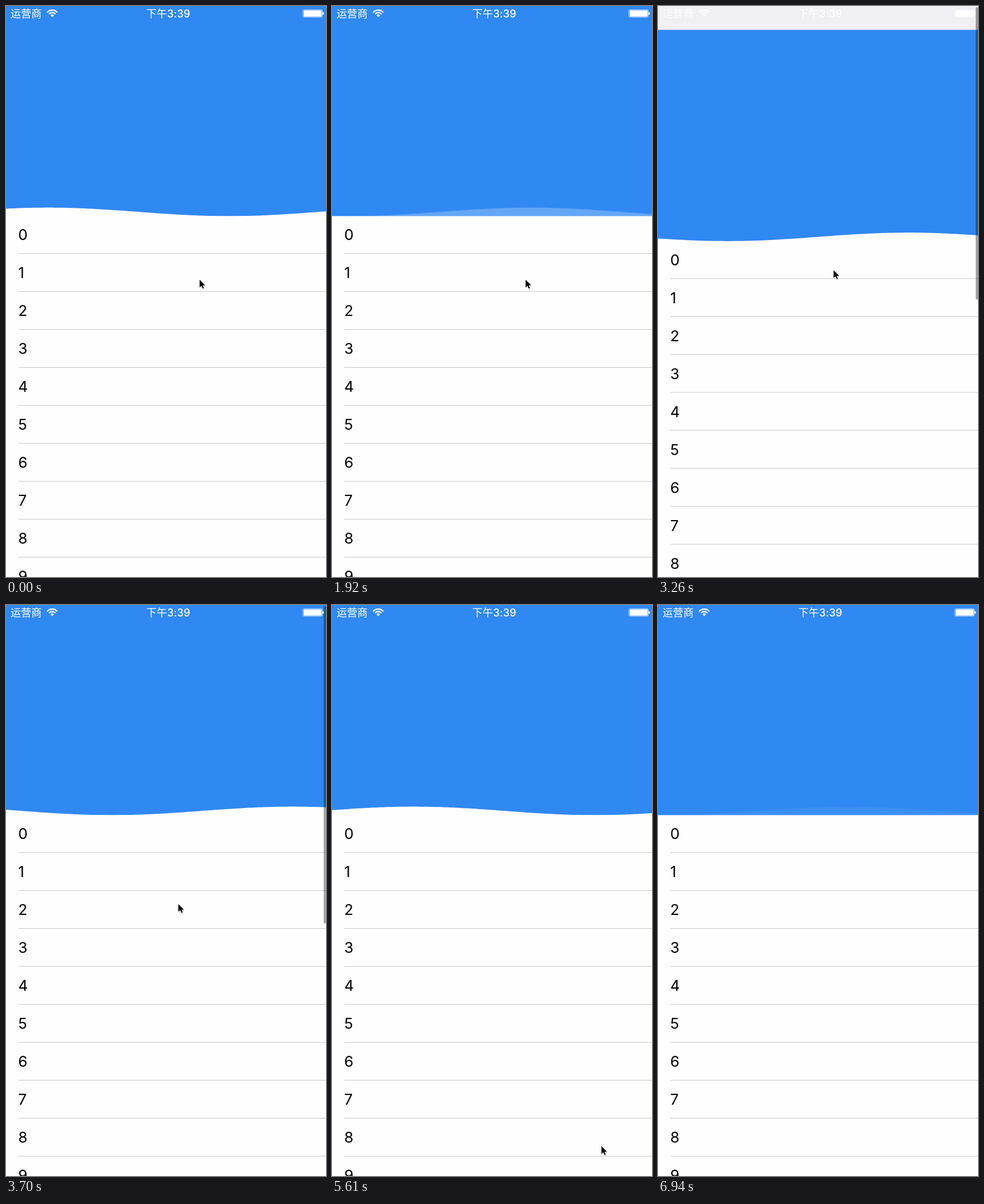
Recreate the animation shown at these times as an HTML page. Size 557 by 993 pixels, loop 7.34 s.

```html
<!DOCTYPE html>
<html lang="zh">
<head>
<meta charset="utf-8">
<style>
  html, body { margin: 0; width: 100%; height: 100%; overflow: hidden; background: #efeff4; }
  svg { display: block; width: 557px; height: 993px; }
  text { font-family: Inter, "Noto Sans CJK SC", "Noto Sans CJK", sans-serif; }
  .row { font-size: 26px; }
  .carrier { font-size: 18px; }
  .clock { font-size: 18px; font-weight: 500; letter-spacing: .25px; }
</style>
</head>
<body>
<svg viewBox="0 0 557 993">
  <g id="page">
    <rect y="-2" width="557" height="368" fill="#3088f3"/>
    <path id="wave" fill="#fefefe"/>
    <rect y="365.4" width="557" height="700" fill="#fefefe"/>
    <g id="rows"></g>
  </g>
  <g fill="#fff">
    <text class="carrier" x="8" y="19.5">运营商</text>
    <g fill="none" stroke="#fff" stroke-width="2.3">
      <path d="M71.7 11.2A11.7 11.7 0 0 1 89.3 11.2"/>
      <path d="M74.9 14A7.5 7.5 0 0 1 86.1 14"/>
    </g>
    <path d="M80.5 19.3L77.5 16.3A4.3 4.3 0 0 1 83.5 16.3Z"/>
    <text class="clock" x="244" y="19.5">下午3:39</text>
    <rect x="516.5" y="6.5" width="34" height="13" rx="2" fill="none" stroke="#fff" stroke-opacity=".6"/>
    <rect x="518" y="7.5" width="31.5" height="11" rx="1"/>
    <path d="M551 10.5Q553.5 10.8 553.5 13T551 15.5Z"/>
  </g>
  <rect id="bar" x="553" y="2" width="4" rx="2" fill="#000" fill-opacity=".36"/>
  <g id="cursor">
    <path d="M.5 1.5V15.5L3.8 12.5L6.1 17.5L8.4 16.5L6.2 11.7H10.5Z" opacity=".22"/>
    <path d="M0 0V13.5L3.2 10.6L5.4 15.5L7.5 14.5L5.4 9.8H9.6Z" stroke="#fff" stroke-width="1.8" paint-order="stroke"/>
  </g>
</svg>
<script>
// The picture advances in equal steps; the last one is held until the loop ends.
const LOOP = 7340, STEP = 147.66, LAST = 47;
const PULL = 20, RELEASE = 23, REST = 25;
const WAVE = { length: 630, height: 7.4, middle: 358, speed: 21 };

const moves = [
  { from: 15.5, to: 18, dx: -21, dy: -128 },
  { from: 19, to: 24, dx: -16, dy: 172 },
  { from: 28, to: 36, dx: 169, dy: 421 },
  { from: 40, to: 43, dx: 11, dy: 62 }
];

const $ = id => document.getElementById(id);
const clamp = p => Math.min(1, Math.max(0, p));

function ease(n, from, to) {
  const p = clamp((n - from) / (to - from));
  return p * p * (3 - 2 * p);
}

function pullOffset(n) {
  if (n < PULL || n > REST) return 0;
  if (n <= RELEASE) return 21.75 * (n - PULL);
  return 65 * ((REST - n) / (REST - RELEASE)) ** 2;
}

function wavePath(crest) {
  let d = 'M0 366';
  for (let x = 0; x <= 560; x += 4) {
    const y = WAVE.middle - WAVE.height * Math.cos(2 * Math.PI * (x - crest) / WAVE.length);
    d += `L${x} ${y.toFixed(2)}`;
  }
  return d + 'V366Z';
}

function pointer(n) {
  let x = 337, y = 476;
  for (const m of moves) {
    const p = ease(n, m.from, m.to);
    x += m.dx * p;
    y += m.dy * p;
  }
  return `translate(${x} ${y})`;
}

function set(id, attrs) {
  for (const name in attrs) $(id).setAttribute(name, attrs[name]);
}

function draw(ms) {
  const n = Math.min(LAST, Math.floor((ms % LOOP + 4) / STEP));
  const firstRun = n < PULL;
  const off = pullOffset(n);
  set('page', { transform: `translate(0 ${off})` });
  set('wave', {
    d: wavePath((firstRun ? 73 : -26) + WAVE.speed * n),
    opacity: 1 - (firstRun ? ease(n, 8.5, 15.2) : ease(n, 41.5, 47.9))
  });
  set('bar', {
    height: 552 - off,
    opacity: clamp(Math.min(n - PULL + .6, (REST + 2 - n) / 2))
  });
  set('cursor', { transform: pointer(n) });
}

let rows = '';
for (let i = 0; i < 10; i++) {
  rows += `<text class="row" x="21.3" y="${407 + 66 * i}">${i}</text>` +
    `<rect x="21.5" y="${430 + 66 * i}" width="536" height="1" fill="#c8c7cc"/>`;
}
$('rows').innerHTML = rows;

const start = performance.now();
function tick() {
  draw(performance.now() - start);
  requestAnimationFrame(tick);
}
tick();
</script>
</body>
</html>
```
